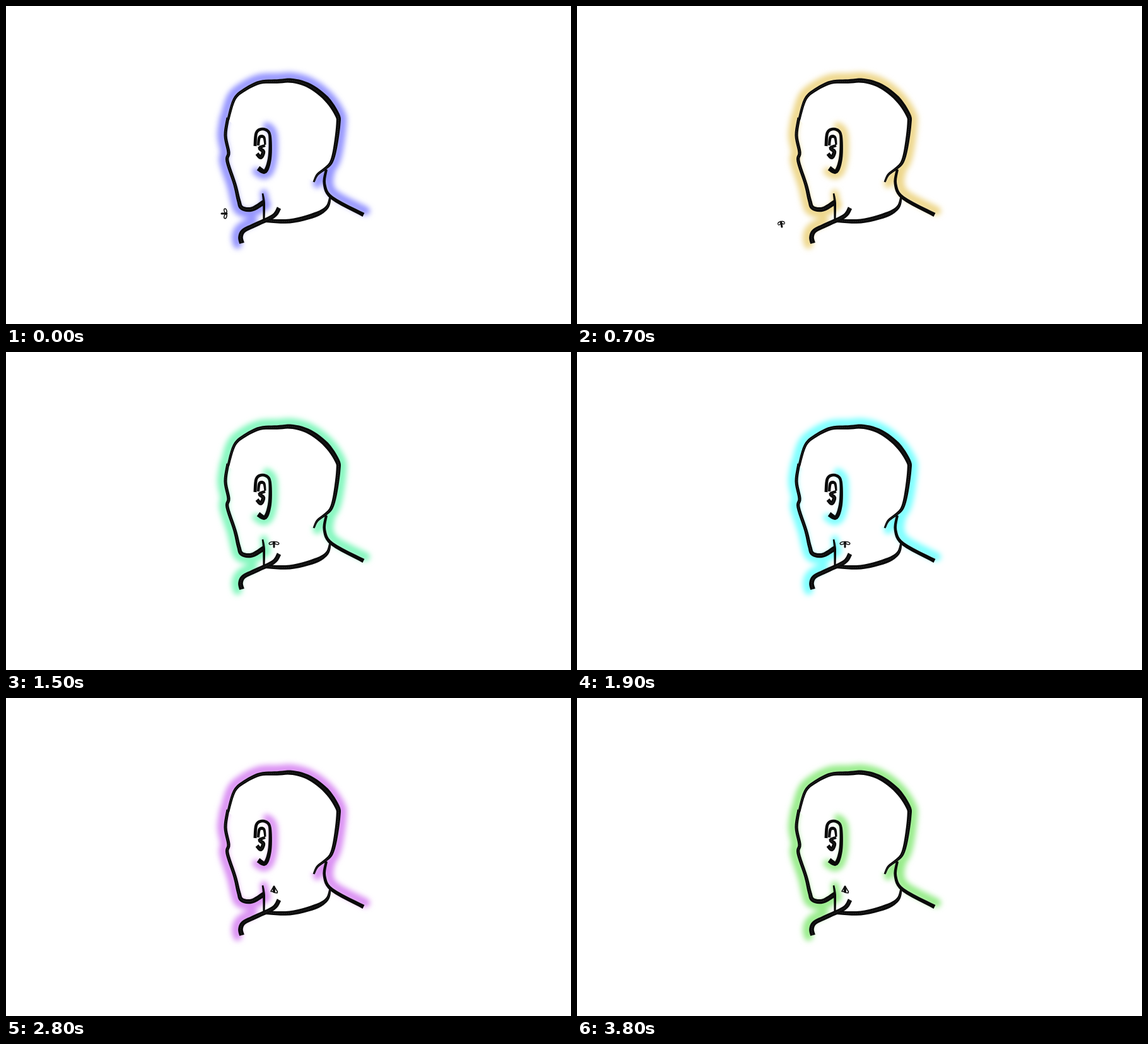
An HTML page for the animation above (3900 ms loop, 896x504 px).

```html
<!DOCTYPE html>
<html lang="en">
<head>
<meta charset="utf-8">
<title>Head and fly</title>
<style>
html, body { margin: 0; width: 100%; height: 100%; overflow: hidden; background: #fff; }
svg { display: block; width: 896px; height: 504px; }
</style>
</head>
<body>
<svg viewBox="0 0 896 504">
  <defs>
    <filter id="soft" filterUnits="userSpaceOnUse" x="300" y="70" width="320" height="340">
      <feGaussianBlur stdDeviation="4.5"/>
    </filter>
  </defs>
  <g fill="none" stroke-linecap="round" stroke-linejoin="round">
    <g id="outer" stroke-width="14" filter="url(#soft)"></g>
    <path id="skin" fill="#fff"/>
    <g id="inner" stroke-width="12" filter="url(#soft)"></g>
  </g>
  <g id="ink" fill="#0a0a0a"></g>
  <g id="fly" fill="none" stroke="#111" stroke-linecap="round" stroke-linejoin="round">
    <g id="open">
      <g id="wings" stroke-width="1.5">
        <ellipse cx="-4.4" cy="-1" rx="3.500" ry="2" transform="rotate(-18 -4.4 -1)"/>
        <ellipse cx="4.4" cy="-1" rx="3.500" ry="2" transform="rotate(18 4.4 -1)"/>
      </g>
      <path d="M0-3V5" stroke-width="3"/>
    </g>
    <g id="shut">
      <path d="M0-6L-5 2.5L-1 3M0-6L5.5 3L5 5L1 4.5" stroke-width="1.6"/>
      <path d="M0-4V3" stroke-width="4"/>
    </g>
  </g>
</svg>
<script>
const LOOP = 3900, STEP = 100;
const $ = id => document.getElementById(id);
const mix = (a, b, u) => a + (b - a) * u;

function add(parent, attrs) {
  const el = document.createElementNS('http://www.w3.org/2000/svg', 'path');
  for (const k in attrs) el.setAttribute(k, attrs[k]);
  $(parent).appendChild(el);
}

// Catmull-Rom samples through a flat list of coordinates
function curve(flat, n = 6) {
  const p = [], out = [];
  for (let i = 0; i < flat.length; i += 2) p.push([flat[i], flat[i + 1]]);
  const at = i => p[Math.max(0, Math.min(p.length - 1, i))];
  for (let i = 0; i < p.length - 1; i++) {
    for (let k = 0; k < n; k++) {
      const u = k / n;
      out.push([0, 1].map(c => {
        const [a, b, d, e] = [-1, 0, 1, 2].map(j => at(i + j)[c]);
        return b + u * ((d - a) + u * ((2 * a - 5 * b + 4 * d - e) + u * (3 * b - a - 3 * d + e))) / 2;
      }));
    }
  }
  out.push(at(p.length));
  return out;
}

const toPath = pts => 'M' + pts.map(q => q[0].toFixed(2) + ' ' + q[1].toFixed(2)).join('L');

// Shift each sample sideways by dist(f), f running from 0 to 1
function offset(pts, dist) {
  const last = pts.length - 1;
  return pts.map(([x, y], i) => {
    const a = pts[Math.max(0, i - 1)], b = pts[Math.min(last, i + 1)];
    const dx = b[0] - a[0], dy = b[1] - a[1], d = dist(i / last) / (Math.hypot(dx, dy) || 1);
    return [x + dy * d, y - dx * d];
  });
}

// Brush stroke with a width at its start, middle and end
function brush(pts, w0, w1, w2) {
  const half = f => (f < 0.5 ? mix(w0, w1, f * 2) : mix(w1, w2, f * 2 - 1)) / 2;
  const sides = offset(pts, half).concat(offset(pts, f => -half(f)).reverse());
  add('ink', { d: toPath(sides) + 'Z' });
  if (w1 > 5) add('ink', { d: toPath(pts), fill: 'none', stroke: '#444', 'stroke-width': 0.7, 'stroke-dasharray': '2 1' });
}

// Soft light beside part of a stroke
function glow(group, pts, side, from = 0, to = 1) {
  const part = offset(pts, () => side).slice(Math.round(from * pts.length), Math.round(to * pts.length));
  add(group, { d: toPath(part) });
}

const skull = curve([352, 181, 362, 148, 378, 133, 403, 121, 430, 119.5, 455, 118.5, 482, 127, 508, 147,
  525, 172, 527, 187, 522, 225, 516, 247, 507, 257, 494, 267, 488, 279]);
const face = curve([352, 177, 348, 205, 353, 232, 351, 246, 363, 283, 369, 308, 374, 320, 390, 322, 409, 311]);
const jaw = curve([407, 297, 409, 312, 409, 340]);
const collar = curve([411, 340, 450, 341, 490, 331, 509, 319, 514, 303]);
const chest = curve([433, 320, 424, 333, 395, 347, 377, 356, 372, 366, 374, 376]);
const nape = curve([508, 259, 505, 282, 517, 304, 567, 331]);
const ear = curve([395, 222, 397, 201, 406, 195, 416, 199, 419, 212, 418, 242, 411, 262, 400, 257]);
const fold = curve([400, 221, 402, 208, 409, 208, 411, 220]);
const lobe = curve([411, 221, 402, 225, 408, 231, 404, 240, 398, 234]);

$('skin').setAttribute('d', toPath(skull) + 'Z');
glow('outer', face, -6);
glow('outer', skull, 6);
glow('outer', nape, 7);
glow('outer', chest, -7, 0.4);
glow('inner', ear, 6, 0.35);
glow('inner', jaw, 2, 0, 0.5);

brush(skull, 4, 8.5, 3);
brush(face, 5, 5.5, 8);
brush(jaw, 2.5, 4, 3);
brush(collar, 6, 8, 3);
brush(chest, 7, 7, 8);
brush(nape, 4, 5, 6.5);
brush(ear, 5, 4.5, 8);
brush(fold, 4, 5, 3);
brush(lobe, 4, 6.5, 6);

// time, hue, saturation, lightness
const hues = [
  [0, 240, 100, 79], [400, 350, 74, 74], [1100, 480, 76, 74], [1900, 540, 100, 74],
  [2400, 660, 100, 79], [3200, 630, 60, 72], [3800, 472, 72, 73]
];
// time, x, y, heading
const flight = [
  [0, 347, 329, 90], [250, 358, 345, 190], [400, 340, 354, 270],
  [700, 324, 345, 350], [1100, 364, 312, 415], [1500, 425, 304, 360]
];

function sample(keys, t) {
  let i = 0;
  while (i < keys.length - 2 && t >= keys[i + 1][0]) i++;
  const a = keys[i], b = keys[i + 1], u = Math.min(1, (t - a[0]) / (b[0] - a[0]));
  return a.slice(1).map((v, k) => mix(v, b[k + 1], u));
}

function draw(ms) {
  const t = Math.floor(ms % LOOP / STEP) * STEP;
  const [h, s, l] = sample(hues, t), color = `hsl(${h % 360} ${s}% ${l}%)`;
  $('outer').setAttribute('stroke', color);
  $('inner').setAttribute('stroke', color);

  const [x, y, turn] = sample(flight, t), landed = t >= 2000;
  const beat = t < 1500 && t / STEP % 2 ? 0.7 : 1;
  $('fly').setAttribute('transform', `translate(${x} ${y}) rotate(${turn})`);
  $('wings').setAttribute('transform', `scale(${beat} 1)`);
  $('open').setAttribute('visibility', landed ? 'hidden' : 'visible');
  $('shut').setAttribute('visibility', landed ? 'visible' : 'hidden');
}

const start = performance.now();
function tick() {
  draw(performance.now() - start);
  requestAnimationFrame(tick);
}
tick();
</script>
</body>
</html>
```
